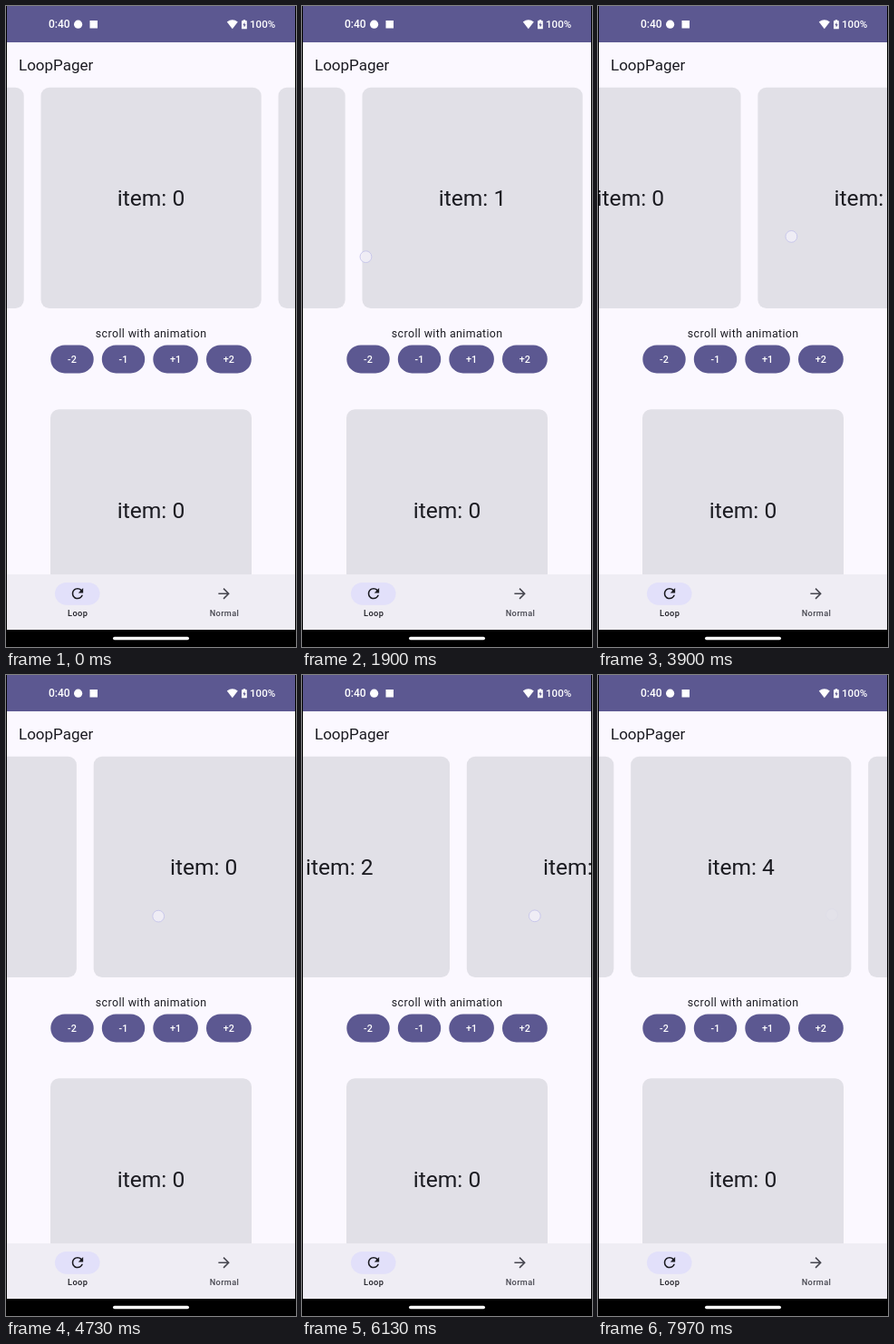
An HTML page that plays this animation: 320x706 px, repeating every 8000 ms.

```html
<!DOCTYPE html>
<html lang="en">
<head>
<meta charset="utf-8">
<title>LoopPager</title>
<style>
  html, body { margin: 0; height: 100%; overflow: hidden; background: #000; }
  svg { display: block; width: 100vw; height: 100vh; }
  text { font-family: Roboto, sans-serif; fill: #1b1b21; }
  .mid { text-anchor: middle; }
  .item { font-size: 24.6px; text-anchor: middle; }
  .card { fill: #e1e0e7; }
  .status { font-size: 11.6px; font-weight: 500; fill: #fff; }
  .btn { font-size: 10.8px; font-weight: 500; fill: #fff; letter-spacing: .08px; text-anchor: middle; }
  .nav { font-size: 9.2px; font-weight: 500; letter-spacing: .39px; text-anchor: middle; }
</style>
</head>
<body>
<svg viewBox="0 0 320 706" preserveAspectRatio="none">
  <defs><clipPath id="screen"><rect x="1" width="318" height="687"/></clipPath></defs>
  <rect width="320" height="706"/>
  <g clip-path="url(#screen)">
    <rect width="320" height="687" fill="#fbf8ff"/>
    <rect width="320" height="40" fill="#5c5891"/>

    <text class="status" x="47" y="24" style="font-size:12px">0:40</text>
    <circle cx="79.6" cy="20.2" r="4.6" fill="#fff"/>
    <rect x="92.5" y="16" width="8.5" height="8.5" fill="#fff"/>
    <path d="M243.8 17.6Q249.8 12.8 255.8 17.6L249.8 25.2Z" fill="#fff"/>
    <path d="M261.6 15.2h2.6v1.1h1.6v8.9h-5.8v-8.9h1.6z" fill="#fff"/>
    <path d="M263.4 17.8l-2 3.4h1.3v2.5l2-3.4h-1.3z" fill="#5c5891"/>
    <text class="status" x="269" y="24">100%</text>

    <text x="14" y="71" font-size="17">LoopPager</text>
    <g id="pager"></g>

    <text class="mid" x="160.2" y="365" font-size="12.4" letter-spacing=".39">scroll with animation</text>
    <g id="buttons"></g>

    <rect class="card" x="49" y="444.3" width="222" height="222" rx="9.3"/>
    <text class="item" x="160" y="564">item: 0</text>

    <rect y="626" width="320" height="61" fill="#efedf4"/>
    <rect x="54" y="635" width="49.5" height="24.7" rx="12.35" fill="#e2e0fa"/>
    <path transform="translate(69.7 637.9) scale(.773)" fill="#1b1b21" d="M17.65 6.35C16.2 4.9 14.21 4 12 4c-4.42 0-7.99 3.58-7.99 8s3.57 8 7.99 8c3.73 0 6.84-2.55 7.73-6h-2.08c-.82 2.33-3.04 4-5.65 4-3.31 0-6-2.69-6-6s2.69-6 6-6c1.66 0 3.14.69 4.22 1.78L13 11h7V4l-2.35 2.35z"/>
    <path transform="translate(231.3 638) scale(.773)" fill="#46464f" d="M12 4l-1.41 1.41L16.17 11H4v2h12.17l-5.58 5.59L12 20l8-8z"/>
    <text class="nav" x="79.2" y="671.5">Loop</text>
    <text class="nav" x="241" y="671.5" style="fill:#46464f">Normal</text>
    <circle id="touch" r="6.4" fill="#f1eff7" fill-opacity=".85" stroke="#c6c4ea" stroke-width=".9"/>
  </g>
  <rect x="118" y="694.8" width="84" height="3.4" rx="1.7" fill="#fff"/>
</svg>
<script>
const LOOP = 8000, PITCH = 262, ITEMS = 5, OMEGA = 0.02, FADE = 300, POW = 1.5;

// Swipes: press time, release time, finger x from/to, finger y from/to
const swipes = [
  [430, 730, 215, 70, 262, 274],
  [1806, 2106, 42.5, 199.5, 278, 268],
  [2370, 2670, 215, 70, 262, 274],
  [3503, 3923, 75.5, 225.5, 264, 253],
  [4570, 4870, 110, 258, 268, 262],
  [5279, 5579, 110.5, 260.5, 266, 262],
  [5840, 6140, 113.5, 263.5, 272, 265],
  [6430, 6680, 106, 256, 272, 264],
  [7031, 7261, 103.5, 253.5, 280, 268],
  [7490, 7710, 108, 258, 274, 264],
];

const $ = id => document.getElementById(id);
const touch = $('touch');

$('buttons').innerHTML = [[49.3, 47.4, '-2'], [105.8, 47.4, '-1'], [162.3, 49.6, '+1'], [221, 49.8, '+2']]
  .map(([x, w, label]) =>
    `<rect x="${x}" y="373.4" width="${w}" height="31" rx="15.5" fill="#5c5891"/>
     <text class="btn" x="${x + w / 2}" y="392.6">${label}</text>`).join('');

$('pager').innerHTML =
  '<g><rect class="card" x="38.5" y="89.7" width="243.2" height="243.2" rx="9.3"/><text class="item" x="160" y="220"></text></g>'.repeat(3);
const cards = [...$('pager').children];

const dragged = (t, [t0, t1]) => Math.min(1, Math.max(0, (t - t0) / (t1 - t0))) ** POW;

// Page travel of one swipe: follows the finger, then springs to the next page
function travel(t, swipe) {
  const [t0, t1, x0, x1] = swipe, span = x1 - x0;
  if (t <= t1) return span * dragged(t, swipe);
  const goal = Math.sign(span) * PITCH, gap = span - goal, v = span * POW / (t1 - t0), dt = t - t1;
  return goal + (gap + (v + OMEGA * gap) * dt) * Math.exp(-OMEGA * dt);
}

function draw(t) {
  if (t > 3900 && t < 4000) t = 3900; // short stall in the middle of a drag
  const scroll = -swipes.reduce((sum, s) => sum + travel(t, s), 0);
  const page = Math.round(scroll / PITCH);
  cards.forEach((card, i) => {
    const n = page + i - 1;
    card.setAttribute('transform', `translate(${n * PITCH - scroll})`);
    card.lastChild.textContent = 'item: ' + ((n % ITEMS) + ITEMS) % ITEMS;
  });

  const active = swipes.find(([t0, t1]) => t >= t0 && t < t1 + FADE);
  touch.setAttribute('opacity', active ? Math.min(1, 1 - (t - active[1]) / FADE) : 0);
  if (active) {
    const [, , x0, x1, y0, y1] = active, k = dragged(t, active);
    touch.setAttribute('cx', x0 + (x1 - x0) * k);
    touch.setAttribute('cy', y0 + (y1 - y0) * k);
  }
}

const start = performance.now();
function tick() {
  draw((performance.now() - start) % LOOP);
  requestAnimationFrame(tick);
}
tick();
</script>
</body>
</html>
```
